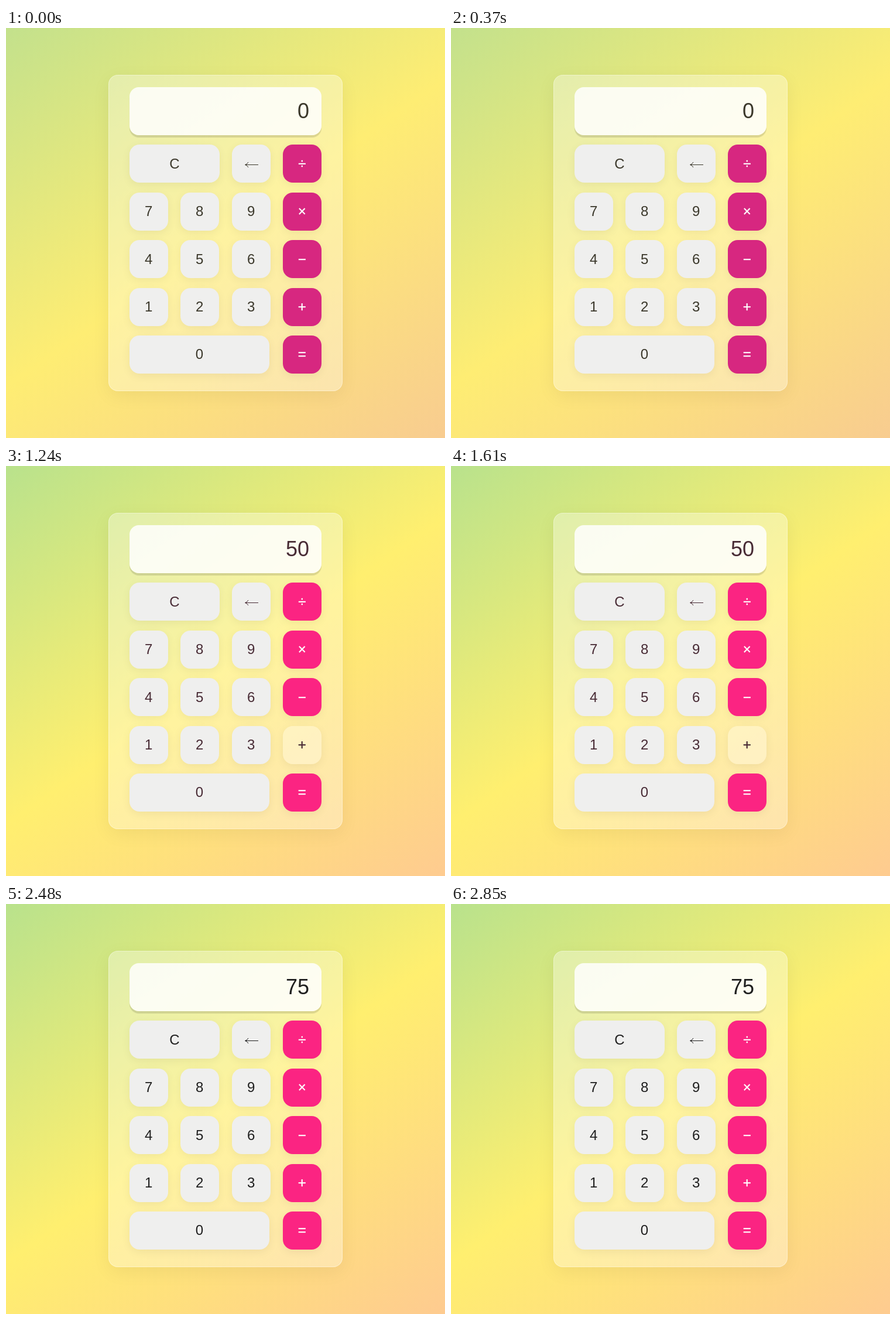
These frames come from a looping animation (750 px wide and 700 px high, 3.1 s). An HTML page:

```html
<!DOCTYPE html>
<html lang="en">
<head>
<meta charset="utf-8">
<title>Calculator</title>
<style>
  html, body { margin: 0; width: 100%; height: 100%; overflow: hidden; }
  body {
    --ink: #1f1f1f; --accent: #fb2482;
    --from: #b9e28c; --mid: #ffef6f; --to: #fecb90;
    position: relative;
    background: linear-gradient(145deg, var(--from), var(--mid) 50%, var(--to));
    font: 24px "Liberation Sans", Arial, sans-serif;
    color: var(--ink);
  }
  div { position: absolute; box-sizing: border-box; }
  #panel {
    left: 175px; top: 80px; width: 400px; height: 540px;
    border: 1px solid rgba(255, 255, 255, .35); border-radius: 16px;
    background: rgba(255, 255, 255, .33);
    box-shadow: 0 8px 32px rgba(0, 0, 0, .06);
  }
  #display {
    left: 211px; top: 101px; width: 328px; height: 82px;
    padding-right: 21px; border-radius: 16px;
    background: rgba(255, 255, 255, .85);
    box-shadow: 0 4px 1px rgba(0, 0, 0, .12);
    font-size: 36px; line-height: 82px; text-align: right;
  }
  .key {
    height: 65px; border-radius: 17px;
    background: #efefee;
    box-shadow: 0 4px 16px rgba(0, 0, 0, .06);
    text-align: center;
  }
  .op { background: var(--accent); color: #fff; -webkit-text-stroke: .4px; }
  .op.down { background: rgba(255, 255, 255, .3); color: var(--ink); }
  svg { display: block; fill: none; stroke: currentColor; }
</style>
</head>
<body>
<div id="panel"></div>
<div id="display">0</div>
<script>
  const STEP = 620;
  const PITCH_X = 87.4, PITCH_Y = 81.34;
  const ARROW = '<svg width="66" height="65"><path d="M22.5 34.5H45M28 30Q26 33.5 22.5 34.5Q26 35.5 28 39"/></svg>';
  const display = document.getElementById('display');
  const keys = {};

  // Each row lists label, column and width.
  const rows = [
    [['C', 0, 154], ['←', 2], ['÷', 3]],
    [['7', 0], ['8', 1], ['9', 2], ['×', 3]],
    [['4', 0], ['5', 1], ['6', 2], ['−', 3]],
    [['1', 0], ['2', 1], ['3', 2], ['+', 3]],
    [['0', 0, 239], ['=', 3]]
  ];

  rows.forEach((row, r) => row.forEach(([label, col, width = 65.6]) => {
    const key = document.createElement('div');
    const y = 199.48 + r * PITCH_Y, top = Math.round(y);
    key.className = col === 3 ? 'key op' : 'key';
    key.innerHTML = label === '←' ? ARROW : label;
    key.style.left = Math.round(211 + col * PITCH_X) + 'px';
    key.style.top = top + 'px';
    key.style.width = width + 'px';
    // Boxes snap to the nearest pixel, labels to the pixel above.
    key.style.lineHeight = 65 - 2 * (top - Math.floor(y)) + 'px';
    document.body.append(key);
    keys[label] = key;
  }));

  const base = { ink: '#1f1f1f', accent: '#fb2482', from: '#b9e28c', mid: '#ffef6f', to: '#fecb90' };
  const states = [
    { value: '0', theme: { ink: '#3b382b', accent: '#d72780', from: '#c3e18c', mid: '#feed73', to: '#f8cc90' } },
    { value: '50' },
    { value: '50', down: '+', theme: { ink: '#482b35' } },
    { value: '25', down: '=' },
    { value: '75' }
  ];

  let shown = -1;
  function show(index) {
    if (index === shown) return;
    shown = index;
    const { value, down, theme } = states[index];
    display.textContent = value;
    for (const [name, color] of Object.entries({ ...base, ...theme }))
      document.body.style.setProperty('--' + name, color);
    for (const label of ['+', '='])
      keys[label].classList.toggle('down', label === down);
  }

  const start = performance.now();
  function tick() {
    const elapsed = Math.max(0, performance.now() - start);
    show(Math.floor(elapsed / STEP) % states.length);
    requestAnimationFrame(tick);
  }
  show(0);
  requestAnimationFrame(tick);
</script>
</body>
</html>
```
